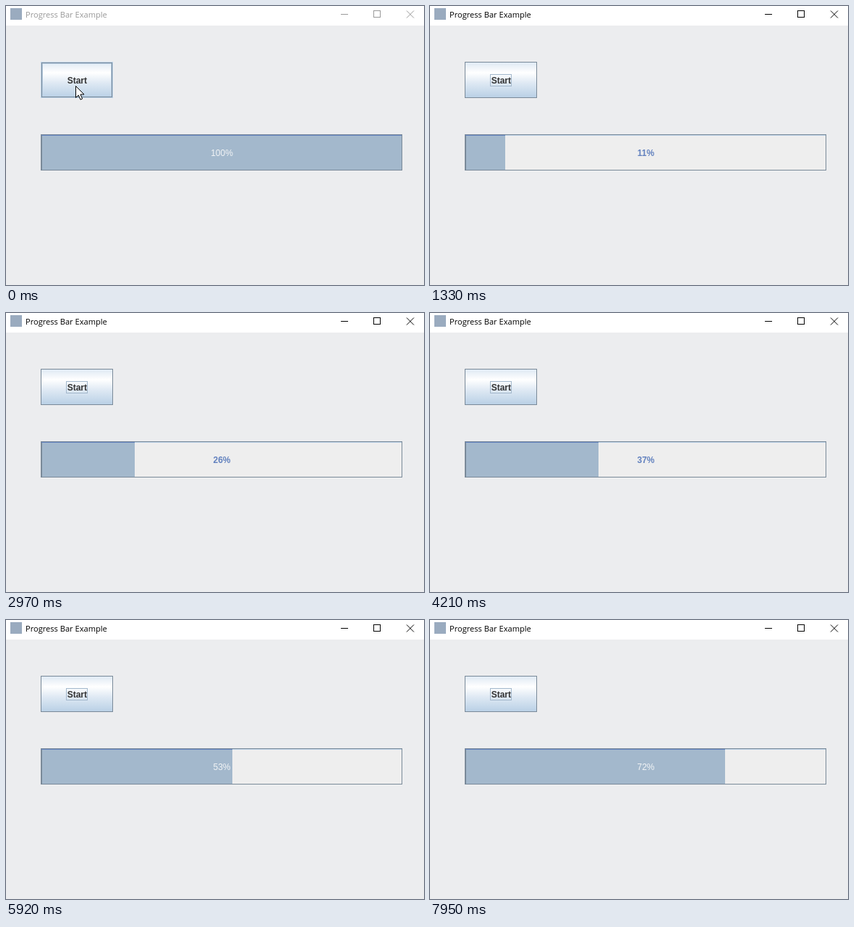
An HTML page for the animation above (8000 ms loop, 578 by 385 pixels).

```html
<!DOCTYPE html>
<html lang="en">
<head>
<meta charset="utf-8">
<title>Progress Bar Example</title>
<style>
html, body { margin: 0; width: 100%; height: 100%; overflow: hidden; background: #ecedef; }
svg { display: block; }
rect, .crisp { shape-rendering: crispEdges; }
text { font: bold 12px "Liberation Sans", Arial, sans-serif; text-anchor: middle; }
#caption { font: 11.1px "Open Sans", sans-serif; text-anchor: start; }
#done text { font-weight: 400; fill: #f2f4f6; }
.line { fill: none; stroke: #7a8a99; }
.pale { fill: none; stroke: #b8cfe5; }
</style>
</head>
<body>
<svg width="578" height="385" viewBox="0 0 578 385">
  <defs>
    <linearGradient id="shine" x2="0" y2="1">
      <stop stop-color="#dde8f3"/>
      <stop offset=".3" stop-color="#fff"/>
      <stop offset=".6" stop-color="#dde8f3"/>
      <stop offset="1" stop-color="#b8cfe5"/>
    </linearGradient>
    <clipPath id="filled"><rect id="clip" x="49" y="178" height="48"/></clipPath>
  </defs>
  <rect width="578" height="385" fill="#ecedef"/>

  <rect width="578" height="27" fill="#fff"/>
  <rect x="6" y="3" width="16" height="16" fill="#9aabbf"/>
  <g id="titlebar">
    <text id="caption" x="27" y="16">Progress Bar Example</text>
    <g fill="none" stroke="currentColor">
      <path class="crisp" d="M463 11.5h10M508.500 6.500h9v9h-9z"/>
      <path d="M554 6.500l10 10m0-10l-10 10"/>
    </g>
  </g>

  <rect id="face" x="48" y="77" width="100" height="50"/>
  <rect id="edge" class="line" x="48.500" y="77.500" width="99" height="49"/>
  <g id="hover">
    <rect class="pale" x="48.500" y="77.500" width="99" height="49"/>
    <rect class="line" x="49.500" y="78.500" width="97" height="47"/>
    <rect class="pale" x="50.500" y="79.500" width="95" height="45"/>
  </g>
  <rect id="focus" x="83.500" y="94.500" width="29" height="16" fill="none" stroke="#a3b8cc"/>
  <text x="98.300" y="107" fill="#333">Start</text>

  <rect x="48.500" y="177.500" width="499" height="49" fill="#eee" stroke="#7a8a99"/>
  <rect x="49" y="178" width="498" height="1" fill="#b8cfe5"/>
  <text class="count" x="298.500" y="207" fill="#6382bf"></text>
  <g id="done" clip-path="url(#filled)">
    <rect x="49" y="178" width="498" height="48" fill="#a3b8cc"/>
    <rect x="49" y="178" width="1" height="48" fill="#7a8a99"/>
    <rect x="49" y="178" width="498" height="1" fill="#6382bf"/>
    <text class="count" x="298.500" y="207"></text>
  </g>

  <path id="pointer" fill="#fff" stroke="#000" d="M96.500 110.500v16l3.700-3.500 2.800 6.200 2.600-1.200-2.700-6h5.100z"/>
</svg>
<script>
const LOOP = 8000, TICK = 77.87;
const $ = id => document.getElementById(id);
const show = (id, on) => $(id).style.display = on ? "" : "none";
const counts = document.querySelectorAll(".count");

// The counter rises once every 1.395 screen refreshes, starting from the click.
const percentAt = tick => tick < 2 ? 100 : Math.ceil((tick - 1.47) / 1.395) - 1;

function draw(time) {
  const tick = Math.floor((time % LOOP + 4) / TICK);
  const percent = percentAt(tick);
  const active = tick > 0, pressed = tick === 1, over = tick < 7;

  $("titlebar").style.color = active ? "#000" : "#999";
  $("caption").style.fill = active ? "#000" : "#999";
  $("face").setAttribute("fill", pressed ? "#b8cfe5" : "url(#shine)");
  show("edge", pressed || !over);
  show("hover", over && !pressed);
  show("focus", active);
  show("pointer", over);

  $("clip").setAttribute("width", Math.round(4.98 * percent));
  for (const c of counts) c.textContent = percent + "%";
}

let start;
function frame(now) {
  start ??= now;
  draw(now - start);
  requestAnimationFrame(frame);
}
draw(0);
requestAnimationFrame(frame);
</script>
</body>
</html>
```
